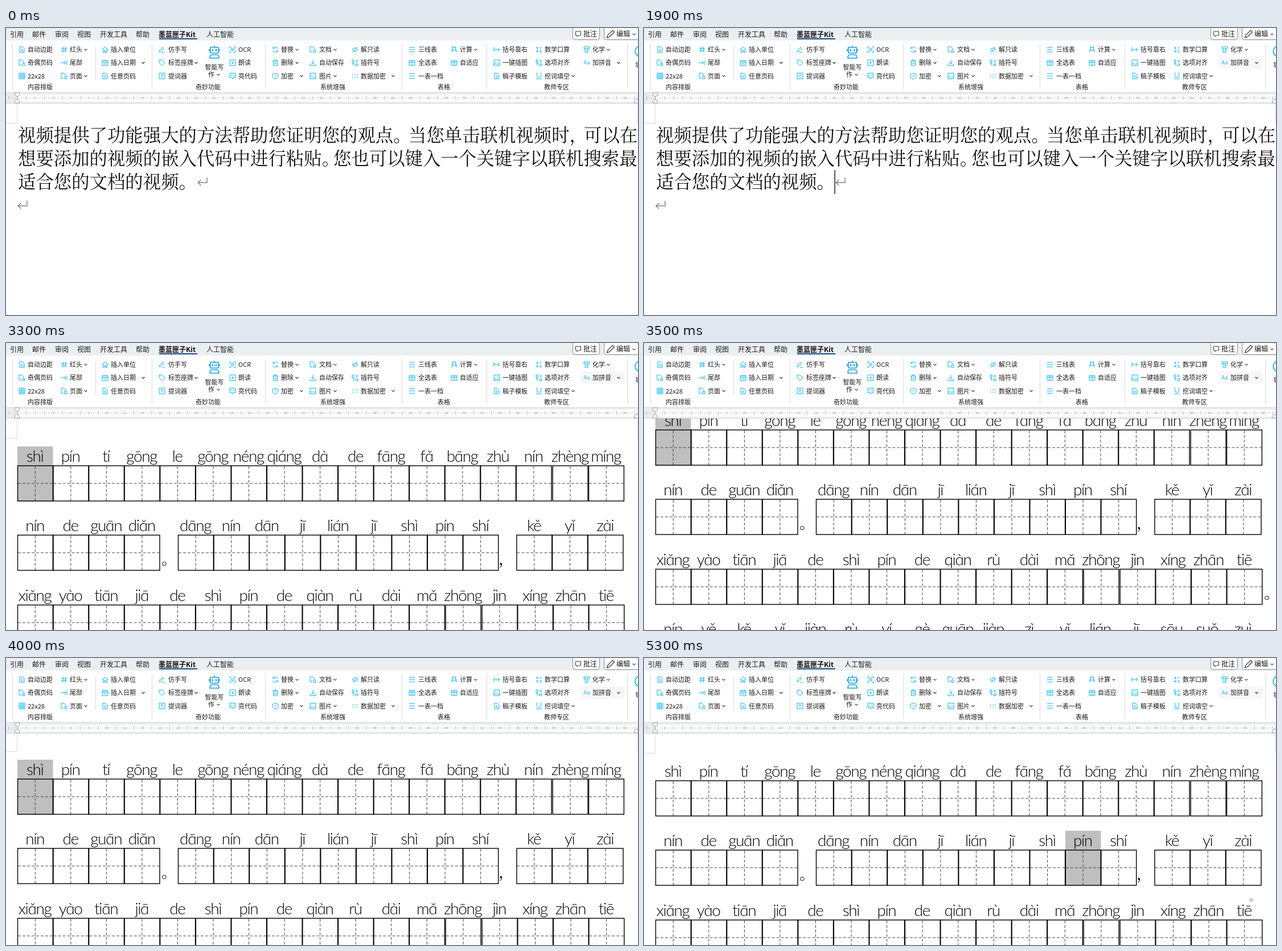
Animation, 1110 px wide and 505 px high, one loop 5400 ms. Source, as an HTML page with a canvas:

```html
<!DOCTYPE html>
<html lang="zh-CN">
<head>
<meta charset="utf-8">
<title>加拼音</title>
<style>
html, body { margin: 0; width: 100%; height: 100%; overflow: hidden; background: #fff; }
canvas { display: block; width: 1110px; height: 505px; }
</style>
</head>
<body>
<canvas id="stage"></canvas>
<script>
const W = 1110, H = 505, LOOP = 5400, STEP = 100, DOC_TOP = 133;
const CYAN = '#06b4f4', INK = '#1a1a1a';
const SANS = '"Noto Sans CJK SC", "Noto Sans CJK", sans-serif';
const SONG = '"Noto Serif CJK SC", "Noto Sans CJK SC", "Noto Sans CJK", serif';
const PINYIN = 'Lato, "Noto Sans", sans-serif';

const canvas = document.getElementById('stage');
const c = canvas.getContext('2d');
const dpr = window.devicePixelRatio || 1;
canvas.width = W * dpr;
canvas.height = H * dpr;

// 12 x 12 line icons
const ICONS = {
  page: 'M2 1h5l3 3v7H2zM4 6h4M4 8.5h4',
  pages: 'M1 1h5l3 3v2M1 1v9h4M7 7h4v4H7z',
  hash: 'M4.5 1l-1 10M9 1L8 11M1 4h10M1 8h10',
  toEnd: 'M0 6h9M6 3l3 3-3 3M11 2v8',
  fromStart: 'M1 2v8M1 6h10M8 3l3 3-3 3',
  grid: 'M1 1h10v10H1zM1 4.5h10M1 8h10M4.5 1v10M8 1v10',
  home: 'M1 6l5-5 5 5M2.5 5v6H5V7.5h2V11h2.5V5',
  date: 'M1 2.5h10V11H1zM1 5.5h10M4 1v3M8 1v3M4 8h4',
  pen: 'M1 10l1-3 5-5 2 2-5 5zM6 11h5',
  tag: 'M1 1h5l5 5-5 5-5-5zM3.5 3.5h1',
  text: 'M1 1h10v10H1zM3.5 4h5M6 4v5',
  scan: 'M4 1H1v3M8 1h3v3M4 11H1V8M8 11h3V8M4 4h4v4H4z',
  play: 'M1 1h10v10H1zM5 4l3 2-3 2z',
  code: 'M1 1h10v8H7l-1 2-1-2H1zM5 3L3 5l2 2M7 3l2 2-2 2',
  sync: 'M11 4.5A5 5 0 0 0 2 4M2 1v3h3M1 7.5A5 5 0 0 0 10 8M10 11V8H7',
  trash: 'M1 3h10M4 3V1h4v2M2.5 3v8h7V3M5 5.5v3M7 5.5v3',
  shield: 'M6 1l5 2v3q0 4-5 5.5Q1 10 1 6V3zM6 4v3',
  save: 'M6 1v7M3 5l3 3 3-3M1 8v3h10V8',
  image: 'M1 1h10v10H1zM1 9l3-3 3 3 2-2 2 2M7 4h1',
  hide: 'M1 6q5-6 10 0q-5 6-10 0zM2 11l8-10',
  symbol: 'M1 1h3v4H1zM7 1l4 4M11 1L7 5M1 7h4M3 7v4M7 8h4v3H7z',
  dots: 'M1 4h2M5 4h2M9 4h2M1 8h2M5 8h2M9 8h2',
  lines: 'M1 2h10M1 6h10M1 10h10',
  sum: 'M2 1.5h8M4 1.5L2 11M8 1.5L10 11M1 7h10',
  table: 'M1 2h10v8.5H1zM1 5h10M6 2v8.5',
  math: 'M1 3h4M3 1v4M7 3h4M1 7l4 4M5 7l-4 4M7 8h4M7 10.5h4',
  under: 'M2.5 0v5a3.5 3.5 0 0 0 7 0V0M1 11h10',
  flask: 'M1 1h10v3H1zM3 4v7h5V4M5 7h3'
};

// icon x, text x, then "icon label [chevron x]" per line
const COLUMNS = [
  [28, 38, 'page 自动边距', 'pages 奇偶页码', 'grid 22x28'],
  [102, 112, 'hash 红头 140', 'toEnd 尾部', 'pages 页面 140'],
  [174, 184, 'home 插入单位', 'date 插入日期 241', 'page 任意页码'],
  [274, 285, 'pen 仿手写', 'tag 标签座牌 334', 'text 提词器'],
  [398, 408, 'scan OCR', 'play 朗读', 'code 亮代码'],
  [473, 483, 'sync 替换 511', 'trash 删除 511', 'shield 加密 519'],
  [539, 550, 'pages 文档 578', 'save 自动保存', 'image 图片 578'],
  [613, 623, 'hide 解只读', 'symbol 插符号', 'dots 数据加密 680'],
  [713, 724, 'lines 三线表', 'table 全选表', 'lines 一表一档'],
  [787, 797, 'sum 计算 825', 'table 自适应'],
  [862, 872, 'fromStart 括号靠右', 'image 一键插图', 'page 稿子模板'],
  [936, 946, 'math 数学口算', 'symbol 选项对齐', 'under 挖词填空 996'],
  [1020, 1030, 'flask 化学 1058', 'Aa 加拼音 1076']
];
const GROUPS = { 内容排版: 60, 奇妙功能: 355, 系统增强: 574, 表格: 769, 教师专区: 967 };
const TABS = { 引用: 7, 邮件: 46, 审阅: 86, 视图: 125, 开发工具: 165, 帮助: 228, 人工智能: 352 };

const PARAGRAPH = [
  [21, 200, '视频提供了功能强大的方法帮助您证明您的观点。'],
  [707, 200, '当您单击联机视频时，'],
  [1015, 200, '可以在'],
  [21, 241, '想要添加的视频的嵌入代码中进行粘贴。'],
  [575, 241, '您也可以键入一个关键字以联机搜索最'],
  [21, 282, '适合您的文档的视频。']
];

// each row: runs of cells as [x, syllables]
const ROWS = [
  [[20, 'shì pín tí gōng le gōng néng qiáng dà de fāng fǎ bāng zhù nín'], [959.7, 'zhèng'], [1023, 'míng']],
  [[20, 'nín de guān diǎn'], [302, 'dāng nín dān jī lián jī shì pín shí'], [896.5, 'kě yǐ zài']],
  [[20, 'xiǎng yào tiān jiā de shì pín de qiàn rù dài mǎ'], [771.7, 'zhōng'], [835.7, 'jìn xíng zhān tiē']],
  [[20, 'nín yě kě yǐ jiàn rù yí gè guān jiàn zì yǐ lián jī sōu suǒ zuì']]
];
const MARKS = [[273, 1, '。'], [865, 1, '，'], [1089, 2, '。']];
const CELL = 62.55, CELL_H = 62;
const rowTop = i => Math.floor(216 + 122.6 * i);

// keyframes as [time, value]
const CARET = [[200, 0], [500, 1], [700, 1], [900, 0], [1200, 0], [1400, 1]];
const DIALOG = [[1900, 0], [2100, 1], [3100, 1], [3300, 0]];
const SCROLL = [[3300, 0], [3400, -32], [3500, -63], [3600, -88], [3700, -94], [3800, -94], [3900, -32], [4000, -3], [4100, 0]];

function track(keys, t) {
  if (t <= keys[0][0]) return keys[0][1];
  for (let i = 1; i < keys.length; i++) {
    const [t0, a] = keys[i - 1], [t1, b] = keys[i];
    if (t <= t1) return a + (b - a) * (t - t0) / (t1 - t0);
  }
  return keys[keys.length - 1][1];
}

function label(s, x, y, size, { color = INK, weight = 400, align = 'left', family = SANS } = {}) {
  c.font = `${weight} ${size}px ${family}`;
  c.textAlign = align;
  c.fillStyle = color;
  c.fillText(s, x, y);
}

function box(x, y, w, h, fill) {
  c.fillStyle = fill;
  c.fillRect(x, y, w, h);
}

function line(x0, y0, x1, y1, color, width = 1) {
  c.strokeStyle = color;
  c.lineWidth = width;
  c.beginPath();
  c.moveTo(x0, y0);
  c.lineTo(x1, y1);
  c.stroke();
}

function panel(x, y, w, h, r, fill, stroke) {
  c.beginPath();
  c.roundRect(x, y, w, h, r);
  c.fillStyle = fill;
  c.fill();
  if (stroke) {
    c.shadowColor = 'transparent';
    c.strokeStyle = stroke;
    c.lineWidth = 1;
    c.stroke();
  }
}

function shadow(alpha, blur, drop) {
  c.shadowColor = `rgba(0,0,0,${alpha})`;
  c.shadowBlur = blur * dpr;
  c.shadowOffsetY = drop * dpr;
}

function path(d, x, y, color, width = 1) {
  c.save();
  c.translate(x, y);
  c.strokeStyle = color;
  c.lineWidth = width;
  c.stroke(new Path2D(d));
  c.restore();
}

const chevron = (x, y) => path('M-2.5 -1.2L0 1.3L2.5 -1.2', x, y, '#333', 1.1);
const returnMark = (x, y) => path('M17 -9V0H1M6.5 -5L1 0L6.5 5', x, y, '#808080', 1.4);

function drawTabs() {
  box(0, 0, W, 24, '#ebeff2');
  for (const [name, x] of Object.entries(TABS)) label(name, x, 15.5, 12);
  label('墨蓝匣子Kit', 268, 15.5, 12, { weight: 700, color: '#111' });
  box(269, 18, 67, 2, '#1f4e8c');
  panel(995.5, -3, 47, 23.5, 4, '#fff', '#8c8c8c');
  path('M0 0h9v7H5l-2.5 2.5V7H0z', 1000.5, 6, '#333');
  label('批注', 1014, 15, 12);
  panel(1050.5, -3, 70, 23.5, 4, '#fff', '#8c8c8c');
  path('M0 13l1.5-4.5L10 0l3 3-8.5 8.5z', 1055.5, 4, '#333', 1.2);
  label('编辑', 1072, 15, 12);
  chevron(1103, 11);
}

function drawRobot() {
  path('M0 -11v3M-7 -8h14v10h-14zM-9 -5v4M9 -5v4M-8 11q0-6 4-6h8q4 0 4 6z', 366, 42, '#189fe0', 1.6);
  box(362, 37, 2, 4, '#189fe0');
  box(368, 37, 2, 4, '#189fe0');
  label('智能写', 366, 73, 11, { align: 'center' });
  label('作', 355, 86, 11);
  chevron(373, 82);
}

function drawRibbon(hover) {
  box(0, 22, W, 92, '#fff');
  if (hover) panel(1009, 50, 77, 22, 3, '#f7f7f7');
  for (const x of [11.5, 256.5, 455.5, 695.5, 844.5, 1091.5]) line(x, 28, x, 108, '#dadada');
  line(157.5, 33, 157.5, 91, '#dadada');
  for (const [ix, tx, ...items] of COLUMNS) {
    items.forEach((item, i) => {
      const [icon, name, chev] = item.split(' '), y = 38 + 23.2 * i;
      if (ICONS[icon]) path(ICONS[icon], ix - 6, y - 6, CYAN);
      else label(icon, ix, y + 3, 9, { color: CYAN, align: 'center' });
      label(name, tx, y + 4.2, 11);
      if (chev) chevron(+chev, y);
    });
  }
  drawRobot();
  for (const [name, x] of Object.entries(GROUPS)) label(name, x, 108, 11, { align: 'center' });
  c.beginPath();
  c.arc(1114, 41, 9, 0, 7);
  c.strokeStyle = CYAN;
  c.lineWidth = 1.6;
  c.stroke();
  label('导', 1105, 70, 11);
}

function drawRuler() {
  box(0, 113, W, 20, '#e9edf0');
  box(0, 113, W, 1, '#d3d7da');
  box(20, 117, 1088, 13, '#fbfbfb');
  for (let i = -4; i < 278; i++) {
    const x = 20 + i * 3.925;
    if (i % 8 === 0 && i) label(Math.abs(i / 4), x, 125, 5, { color: '#888', align: 'center' });
    else if (i % 4 === 0) box(x, 120, 1, 6, '#b4b4b4');
    else box(x, 122.5, 1, 1.5, '#b4b4b4');
  }
  line(0, 132.5, W, 132.5, '#d4d6d8');
  const house = (x, y, d) => {
    c.fillStyle = '#fff';
    c.fillRect(x - 4, Math.min(y, y + 5 * d), 8, 5);
    path(`M-4 0V${4 * d}L0 ${7 * d}L4 ${4 * d}V0z`, x, y, '#999');
  };
  house(19.5, 114, 1);
  house(19.5, 132, -1);
  house(1107.5, 132, -1);
}

function drawParagraph(t) {
  for (const [x, y, s] of PARAGRAPH) label(s, x, y, 31.4, { family: SONG, weight: 300, color: '#111' });
  returnMark(336, 272);
  returnMark(20, 313);
  c.globalAlpha = track(CARET, t);
  box(334.5, 250, 1.3, 42, '#000');
  c.globalAlpha = 1;
}

// pinyin is set with the single-storey a
const syllable = s => s.normalize('NFD').replace(/a/g, '\u0251').normalize('NFC');

function drawCell(x, y, text) {
  const mx = x + CELL / 2, my = y + CELL_H / 2;
  c.setLineDash([5, 3]);
  line(x + 1, my, x + CELL - 1, my, '#444');
  line(mx, y + 1, mx, y + CELL_H, '#444');
  c.setLineDash([]);
  c.strokeStyle = '#000';
  c.lineWidth = 1.4;
  c.strokeRect(x + 0.5, y, CELL - 0.7, CELL_H);
  c.letterSpacing = '-1.4px';
  label(syllable(text), mx - 0.7, y - 7, 28, { family: PINYIN, weight: 300, align: 'center', color: '#000' });
  c.letterSpacing = '0px';
}

function drawGrid(t) {
  const [sx, row] = t < 4300 ? [20, 0] : [740, 1];
  box(sx, rowTop(row) - 34, 62.5, CELL_H + 35, '#bfbfbf');
  ROWS.forEach((runs, i) => {
    for (const [x, text] of runs) {
      text.split(' ').forEach((s, j) => drawCell(x + j * CELL, rowTop(i), s));
    }
  });
  for (const [x, i, s] of MARKS) label(s, x, rowTop(i) + 52, 27, { family: SONG, color: '#000' });
}

function drawDocument(t) {
  c.save();
  c.beginPath();
  c.rect(0, DOC_TOP, W, H - DOC_TOP);
  c.clip();
  c.translate(0, track(SCROLL, t));
  line(0, 167.5, 20, 167.5, '#d8d8d8');
  line(19.5, 100, 19.5, 168, '#d8d8d8');
  line(1108.5, 100, 1108.5, 168, '#e0e0e0');
  if (t < 2600) drawParagraph(t);
  else drawGrid(t);
  c.restore();
}

function drawMenu(t) {
  c.save();
  shadow(0.22, 12, 4);
  panel(1008.5, 72.5, 120, 79, 4, '#fff', '#d6d6d6');
  c.restore();
  if (t >= 1400) box(1010, 99, 100, 26, '#ececec');
  ['去拼音', '看拼音写词', '拼音田字格'].forEach((s, i) => {
    path(ICONS.page, 1020, 80 + 26 * i, CYAN);
    label(s, 1044, 91 + 26 * i, 11);
  });
}

function drawDialog(alpha) {
  if (!alpha) return;
  c.save();
  c.globalAlpha = alpha;
  shadow(0.85, 50, 22);
  panel(395, 283, 267, 88.5, 6, '#f0f0f0');
  shadow(0.5, 20, 5);
  panel(395, 283, 267, 88.5, 6, '#f0f0f0', '#777');
  label('剩余1个部分', 528, 333.5, 14.4, { align: 'center', color: '#111' });
  c.restore();
}

function drawPointer(t) {
  if (t < 5100) return;
  c.globalAlpha = Math.min(1, (t - 5000) / 300);
  c.beginPath();
  c.arc(1066.5, 426, 3.8, 0, 7);
  c.fillStyle = '#d2d2d2';
  c.fill();
  c.globalAlpha = 1;
}

function draw(t) {
  c.setTransform(dpr, 0, 0, dpr, 0, 0);
  box(0, 0, W, H, '#fff');
  drawDocument(t);
  drawPointer(t);
  drawTabs();
  drawRibbon(t >= 1200);
  drawRuler();
  if (t >= 1300 && t < 1900) drawMenu(t);
  drawDialog(track(DIALOG, t));
}

const start = performance.now();
let shown = -1;
function tick() {
  const elapsed = (performance.now() - start) % LOOP;
  const t = Math.floor(elapsed / STEP) * STEP;
  if (t !== shown) draw(shown = t);
  requestAnimationFrame(tick);
}
tick();
</script>
</body>
</html>
```
